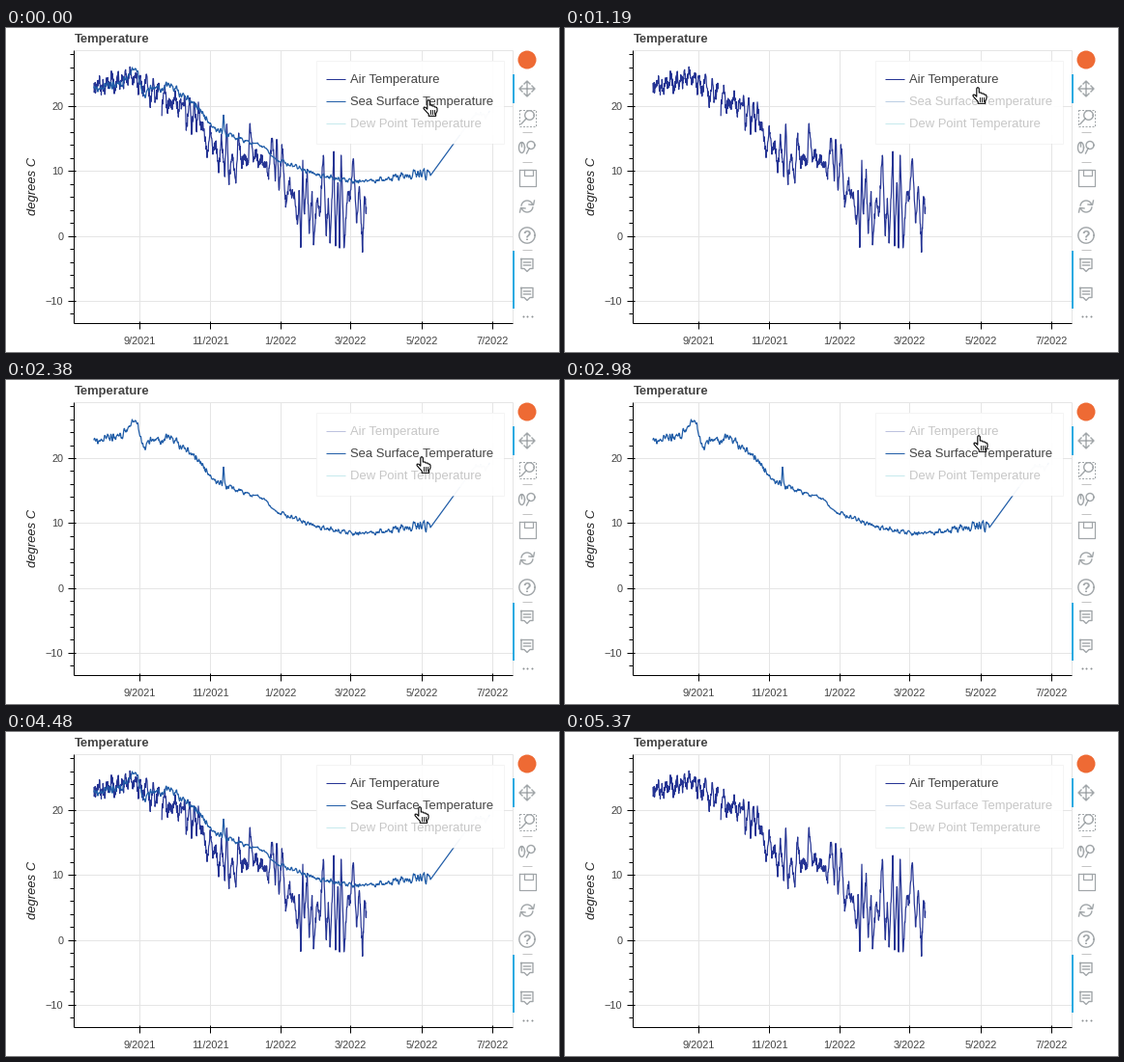
These frames come from a looping animation (572 by 336 pixels, 6430 ms). A matplotlib script:

```python
import numpy as np
import matplotlib.pyplot as plt
from matplotlib.animation import FuncAnimation
from matplotlib.patches import Circle, Polygon, Rectangle

W, H, DPI = 572, 336, 72
LOOP, STEP = 6430, 10
TICK = 148  # the pointer is sampled at this pace, in ms

INK, GRID, ICON = "#444444", "#e5e5e5", "#a1a6a9"
AIR, SEA, DEW = "#253494", "#225ea8", "#41b6c4"
ACTIVE = "#26aae1"

plt.rcParams["font.family"] = "Liberation Sans"
plt.rcParams["toolbar"] = "None"

fig = plt.figure(figsize=(W / DPI, H / DPI), dpi=DPI, facecolor="white")
ax = fig.add_axes([0, 0, 1, 1])
ax.set_xlim(0, W)
ax.set_ylim(H, 0)
ax.set_axis_off()

rng = np.random.default_rng(12)


def y_of(deg):
    return 215.6 - 6.73 * deg


def label(x, y, text, size=11, **kw):
    style = {"color": INK, "va": "baseline", **kw}
    return ax.text(x, y, text, fontsize=size, **style)


def box(x0, y0, x1, y1, **kw):
    return ax.add_patch(Rectangle((x0, y0), x1 - x0, y1 - y0, **kw))


def rules(draw, at, lo, hi, color, z):
    """Parallel straight lines, set on whole pixels."""
    draw(at, lo, hi, colors=color, lw=1, snap=True, zorder=z)


def arc(cx, cy, r, a0=0, a1=360, ry=None):
    a = np.radians(np.linspace(a0, a1, 25))
    return np.column_stack([cx + r * np.cos(a), cy + (ry or r) * np.sin(a)])


def rect(x0, y0, x1, y1):
    return [(x0, y0), (x1, y0), (x1, y1), (x0, y1), (x0, y0)]


def strokes(parts, color, lw, **kw):
    """Draw several polylines as one line with breaks."""
    gap = np.full((1, 2), np.nan)
    pts = np.vstack([p for part in parts for p in (np.asarray(part, float), gap)])
    return ax.plot(*pts.T, color=color, lw=lw, **kw)[0]


def through(x, *points):
    return np.interp(x, *zip(*points))


# Grid, axes and ticks
xs = [138, 211, 284, 356, 430, 503]
months = ["9/2021", "11/2021", "1/2022", "3/2022", "5/2022", "7/2022"]
degs = [20, 10, 0, -10]
rows = [y_of(d) for d in degs]
minor = [y_of(d) for d in range(-12, 29, 2) if d % 10]
rules(ax.vlines, xs, 23, 306, GRID, 1)
rules(ax.hlines, rows, 70, 524, GRID, 1)
rules(ax.vlines, 524, 23, 306, GRID, 1)
rules(ax.hlines, 23, 70, 524, GRID, 1)
rules(ax.vlines, 70, 23, 306, "black", 4)
rules(ax.hlines, 306, 70, 524, "black", 4)
rules(ax.vlines, xs, 304, 312, "black", 4)
rules(ax.hlines, rows, 64, 72, "black", 4)
rules(ax.hlines, minor, 66, 70, "black", 4)

for x, m in zip(xs, months):
    label(x, 327.5, m, ha="center")
for y, d in zip(rows, degs):
    label(59.5, y + 4.2, str(d).replace("-", "\u2212"), ha="right")
label(70.5, 15.2, "Temperature", 13, weight="bold")
label(34, 164, "degrees C", 13, style="italic", rotation=90,
      color="#222222", ha="right", va="center")

# Air temperature: swings between a warm and a cold envelope, plus a daily cycle
turns = 91 + np.cumsum(rng.uniform(1.3, 3.9, 150))
warm = through(turns, (91, 50), (137, 38), (160, 54), (200, 72),
               (225, 84), (265, 100), (300, 120), (373, 126))
cold = through(turns, (91, 72), (135, 60), (142, 84), (170, 90), (200, 122),
               (215, 150), (240, 184), (285, 180), (300, 243), (373, 232))
depth = np.where(np.arange(turns.size) % 2, 0.04, 0.96)
depth += np.sign(0.5 - depth) * 0.5 * rng.random(turns.size) ** 1.3
air_x = np.arange(91, 373, 0.3)
daily = 5 * np.sin(2 * np.pi * air_x / 1.2) * rng.uniform(0.1, 1, air_x.size)
air_y = np.interp(air_x, turns, warm + depth * (cold - warm)) + daily
air_y = np.clip(air_y + rng.normal(0, 2, air_x.size), 37, 247)
air_y[(air_x > 158.6) & (air_x < 161)] = np.nan
air, = ax.plot(air_x, air_y, color=AIR, lw=1.2, zorder=2)

# Sea temperature: a smooth season with shrinking noise, then a gap in the record
sea_x = np.arange(91, 439, 0.5)
season = through(sea_x, (91, 62), (118, 57), (135, 40), (141, 67), (170, 59),
                 (194, 78), (215, 104), (240, 115), (265, 122), (280, 137),
                 (318, 151), (364, 160), (400, 155), (439, 151))
spread = through(sea_x, (91, 3), (200, 2.2), (260, 1.1), (390, 1.6), (439, 3.2))
noise = np.convolve(rng.normal(0, 1, sea_x.size), [0.6, 0.6, 0.3], "same")
spike = 16 * np.exp(-((sea_x - 225) / 0.8) ** 2)
late_x = np.arange(484, 501)
late_y = 90 + rng.normal(0, 2, late_x.size)
sea, = ax.plot(np.r_[sea_x, 439, late_x],
               np.r_[season + spread * noise - spike, 153, late_y],
               color=SEA, lw=1.25, zorder=3)

# Legend; hidden series are veiled in white
frame = (321, 34, 515, 119.5)
box(*frame, fc="white", ec="none", alpha=0.95, zorder=5)
box(*frame, fc="none", ec=GRID, alpha=0.4, lw=1, zorder=5)
veils = []
for y, name, color in [(53, "Air Temperature", AIR),
                       (76, "Sea Surface Temperature", SEA),
                       (99, "Dew Point Temperature", DEW)]:
    rules(ax.hlines, y, 331, 351, color, 6)
    label(356, y + 4, name, 13, zorder=6)
    veils.append(box(330, y - 11, 506, y + 12, fc="white", ec="none",
                     alpha=0.7, zorder=7))

# Toolbar
ax.add_patch(Circle((539, 33), 9.5, fc="#ee6a34", ec="none"))
for y0, y1 in [(48, 78), (231, 291)]:
    box(524, y0, 526, y1, fc=ACTIVE, ec="none", zorder=4)
rules(ax.hlines, [108, 139, 230], 534, 544, "#c4c4c4", 3)

icons = [[(532, 63), (546, 63)], [(539, 56), (539, 70)]]
for dx, dy in [(1, 0), (-1, 0), (0, 1), (0, -1)]:
    tip = np.array([539 + 8 * dx, 63 + 8 * dy])
    back, side = np.array([dx, dy]) * 3, np.array([-dy, dx]) * 3
    icons.append([tip - back + side, tip, tip - back - side])
icons += [
    arc(541.5, 90.5, 4.8), [(538, 94), (533, 99.5)],
    arc(533.5, 124, 3, ry=5.5), [(533.5, 119), (533.5, 123)],
    arc(543, 121.5, 4), [(541, 125), (538.5, 130)],
    arc(539, 185, 6, 190, 335), arc(539, 185, 6, 10, 155),
    [(546.5, 179), (545.5, 183.5), (541, 183)],
    [(531.5, 191), (532.5, 186.5), (537, 187)],
    arc(539, 215, 8.2),
]
for y in (246, 276):
    icons.append([(533, y - 6.5), (545, y - 6.5), (545, y + 3.5), (542, y + 3.5),
                  (539, y + 6.5), (536, y + 3.5), (533, y + 3.5), (533, y - 6.5)])
    icons += [[(535.5, y + k), (542.5, y + k)] for k in (-3, 0)]
strokes(icons, ICON, 1.4)
disk = [rect(530.5, 146.5, 547.5, 163.5), rect(535.5, 146.5, 544.5, 152.5)]
strokes(disk, ICON, 1.2)
strokes([rect(530.5, 84.5, 547.5, 101.5)], ICON, 1, ls=(0, (2, 1.5)))
label(539, 220, "?", 14, color=ICON, ha="center", weight="bold")
ax.scatter([534.5, 539, 543.5], [298.5] * 3, s=4, c="#8c9194", lw=0)

# Hand cursor
hand = np.array([
    (4.8, 10.2), (4.8, 1.8), (5.4, 0.8), (6.6, 0.8), (7.3, 1.8), (7.3, 6),
    (9.4, 6), (10, 7), (12, 7), (12.6, 8), (14.3, 8.2), (15, 9.5), (15, 12),
    (13.6, 15), (13.6, 17.3), (6.2, 17.3), (6.2, 15.3), (3.6, 12.6),
    (1, 9.6), (1.2, 8.2), (2.8, 8.2)])
creases = np.array([(x, y) for x in (8, 10, 12) for y in (11, 14.5, np.nan)])
cursor = ax.add_patch(Polygon(hand, fc="white", ec="black", lw=1.1,
                              joinstyle="round", zorder=9))
lines, = ax.plot(*creases.T, color="black", lw=0.9, zorder=10)


def smooth(u):
    return u * u * (3 - 2 * u)


def ease_out(u):
    return 1 - (1 - u) ** 2


def ease_in(u):
    return u ** 1.6


# start in ms, number of ticks, end point, easing
moves = [(-5, 3, (418, 47), smooth), (1035, 4, (424, 79), ease_out),
         (2380, 4, (422, 57), lambda u: smooth(ease_out(u))),
         (3880, 4, (422, 77), ease_out), (4775, 3, (526, 280), ease_in)]


def cursor_at(t):
    pos = np.array([431.0, 74.0])
    for start, ticks, end, ease in moves:
        u = np.clip((t - start) // TICK / ticks, 0, 1)
        pos += (np.array(end) - pos) * ease(u)
    return np.round(pos)


def update(i):
    t = i * STEP
    air_on = not 1340 <= t < 3880
    sea_on = t < 440 or 2380 <= t < 4930
    air.set_visible(air_on)
    sea.set_visible(sea_on)
    veils[0].set_visible(not air_on)
    veils[1].set_visible(not sea_on)
    pos = cursor_at(t)
    cursor.set_xy(hand + pos)
    lines.set_data(*(creases + pos).T)
    cursor.set_visible(t < 5370)
    lines.set_visible(t < 5370)
    return air, sea, *veils, cursor, lines


anim = FuncAnimation(fig, update, frames=LOOP // STEP, interval=STEP,
                     repeat=True, repeat_delay=0, init_func=lambda: update(0))
plt.show()
```
